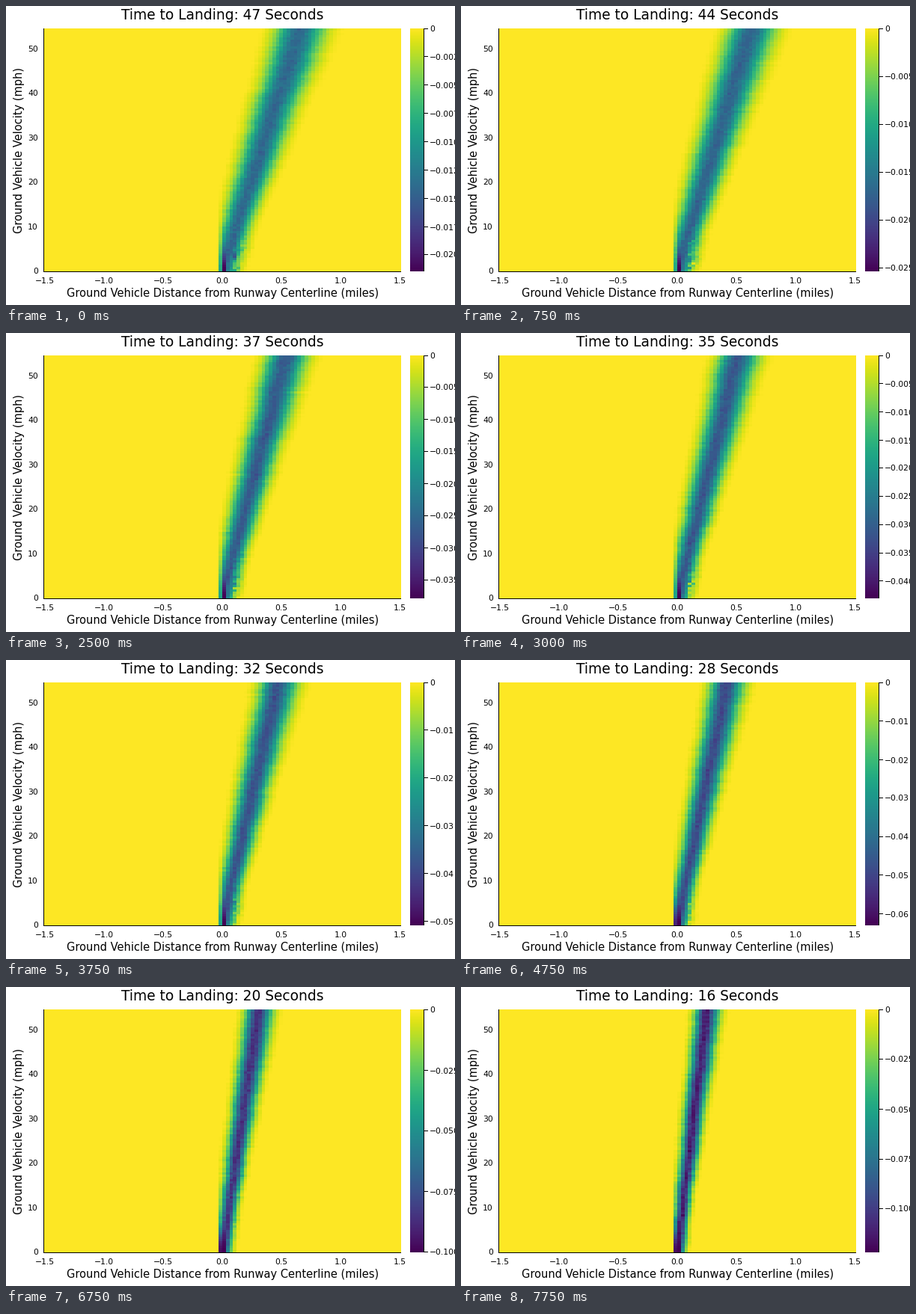
Recreate the animation shown at these times as a matplotlib script. Size 600x400 px, loop 8000 ms.

```python
import numpy as np
import matplotlib.pyplot as plt
from matplotlib.animation import FuncAnimation

W, H, DPI = 600, 400, 100
PT = 72 / DPI                       # points per pixel
FRAMES, INTERVAL, START = 32, 250, 47
COLS, ROWS = 100, 109
LEFT, RIGHT, TOP, BOTTOM = 50, 528, 30, 355
X0, MILE = 289.3, 158               # pixel of zero distance, pixels per mile
Y0, MPH = 354.3, 5.95
BAR_L, BAR_R = 540, 558
TITLE, LABEL, TICK = 18.6, 14.6, 10.8

cell = (RIGHT - LEFT) / COLS
cols = LEFT + cell * (np.arange(COLS) + 0.5)
speed = np.arange(ROWS)[:, None] * 0.5
EDGE = COLS // 2 - 1                # leftmost column that carries any value

plt.rcParams["font.family"] = "DejaVu Sans"
fig = plt.figure(figsize=(W / DPI, H / DPI), dpi=DPI, facecolor="white")
ax = fig.add_axes([0, 0, 1, 1])
ax.axis("off")


def peak(t):
    """Largest magnitude on the colour scale, t seconds before landing."""
    return np.interp(t, [16, 23, 28, 32, 37, 41, 47],
                     [.1218, .0837, .0630, .0508, .0379, .0292, .02146])


def field(t):
    """Normalised magnitude (0..1) over speed rows and distance columns."""
    rng = np.random.default_rng(100 + t)
    slow = np.exp(-(speed / 6) ** 2)
    blocks = np.repeat(rng.normal(0, 0.4, 14), 8)[:ROWS, None]
    wobble = blocks + rng.normal(0, 0.4, (ROWS, 1))
    center = X0 + (1.08 - 0.0032 * t) * speed * t / 3600 * MILE + wobble * (1 - slow)

    # the left flank steepens with speed, the right one is wide when slow
    spread = 2.5 + 0.055 * speed + t * (0.16 + 0.004 * speed)
    spread = spread * (1 + rng.normal(0, 0.02, (ROWS, 1)))
    flank = np.where(cols < center, 1.08 - 0.0046 * speed, 0.95 + 0.3 * slow)
    ridge = np.interp(t, [16, 23, 32, 47], [.92, .82, .75, .67])
    r = ridge * np.exp(-0.5 * ((cols - center) / (spread * flank)) ** 2)
    r = np.maximum(0, r * 1.02 - 0.015)
    r *= 1 + rng.normal(0, 0.03, r.shape)

    # slow vehicles: ragged right fringe and a dark spot at the centerline
    fringe = cols > X0 + 2.5 * cell
    r *= 1 + fringe * slow * rng.normal(0, 0.35, r.shape)
    spot = np.exp(-(speed[:, 0] / 3.5) ** 2)
    r[:, EDGE + 1] += (1 - r[:, EDGE + 1]) * spot
    fade = np.interp(t, [23, 28, 32], [.97, .9, .62])
    r[:, EDGE] += (1 - r[:, EDGE]) * spot * (fade > 0.8)
    r[:, EDGE] *= fade
    r[:, :EDGE] = 0
    return np.clip(r, 0, 1)


def text(x, y, s, size, ha="center", **kw):
    return ax.text(x, y, s, fontsize=size * PT, ha=ha, va="baseline",
                   color="black", **kw)


def line(xs, ys):
    return ax.plot(xs, ys, color="black", lw=PT, snap=False, zorder=5,
                   solid_capstyle="butt")[0]


def image(data, left, right):
    return ax.imshow(data, cmap="viridis_r", vmin=0, vmax=1, origin="lower",
                     extent=(left, right, BOTTOM, TOP),
                     interpolation="nearest", aspect="auto")


heat = image(np.zeros((ROWS, COLS)), LEFT, RIGHT)
image(np.linspace(1, 0, 256)[:, None], BAR_L, BAR_R)
ax.set_xlim(0, W)
ax.set_ylim(H, 0)

line([LEFT + 0.5] * 2, [TOP, BOTTOM + 1])
line([LEFT, RIGHT], [BOTTOM + 0.5] * 2)
line([BAR_R + 0.5] * 2, [TOP, BOTTOM])

for d in np.arange(-1.5, 1.6, 0.5):
    text(X0 + d * MILE, 371, f"{d:.1f}".replace("-", "\u2212"), TICK)
for v in range(0, 60, 10):
    text(43, Y0 - v * MPH + 4, str(v), TICK, ha="right")

title = text(289.5, 17.5, "", TITLE)
text(289.5, 388.5, "Ground Vehicle Distance from Runway Centerline (miles)", LABEL)
text(21.8, 193, "Ground Vehicle Velocity (mph)", LABEL, rotation=90,
     rotation_mode="anchor")

ticks = [(line([BAR_R, BAR_R + 6], [0, 0]), text(566, 0, "", TICK, ha="left"))
         for _ in range(10)]


def set_scale(top):
    step, digits = next(((s, n) for s, n in
                         [(.0025, 4), (.005, 3), (.01, 2), (.025, 3)]
                         if top / s < 9), (.025, 3))
    for i, (mark, label) in enumerate(ticks):
        shown = i * step <= top
        y = np.floor(TOP + (BOTTOM - TOP) * i * step / top) + 0.5
        mark.set_ydata([y, y])
        label.set_y(y + 4)
        label.set_text(f"\u2212{i * step:.{digits}f}" if i else "0")
        mark.set_visible(shown)
        label.set_visible(shown)


def update(n):
    t = START - n
    heat.set_data(field(t))
    title.set_text(f"Time to Landing: {t} Seconds")
    set_scale(peak(t))
    return []


anim = FuncAnimation(fig, update, frames=FRAMES, interval=INTERVAL,
                     init_func=lambda: update(0), repeat=True, repeat_delay=0)
plt.show()
```
